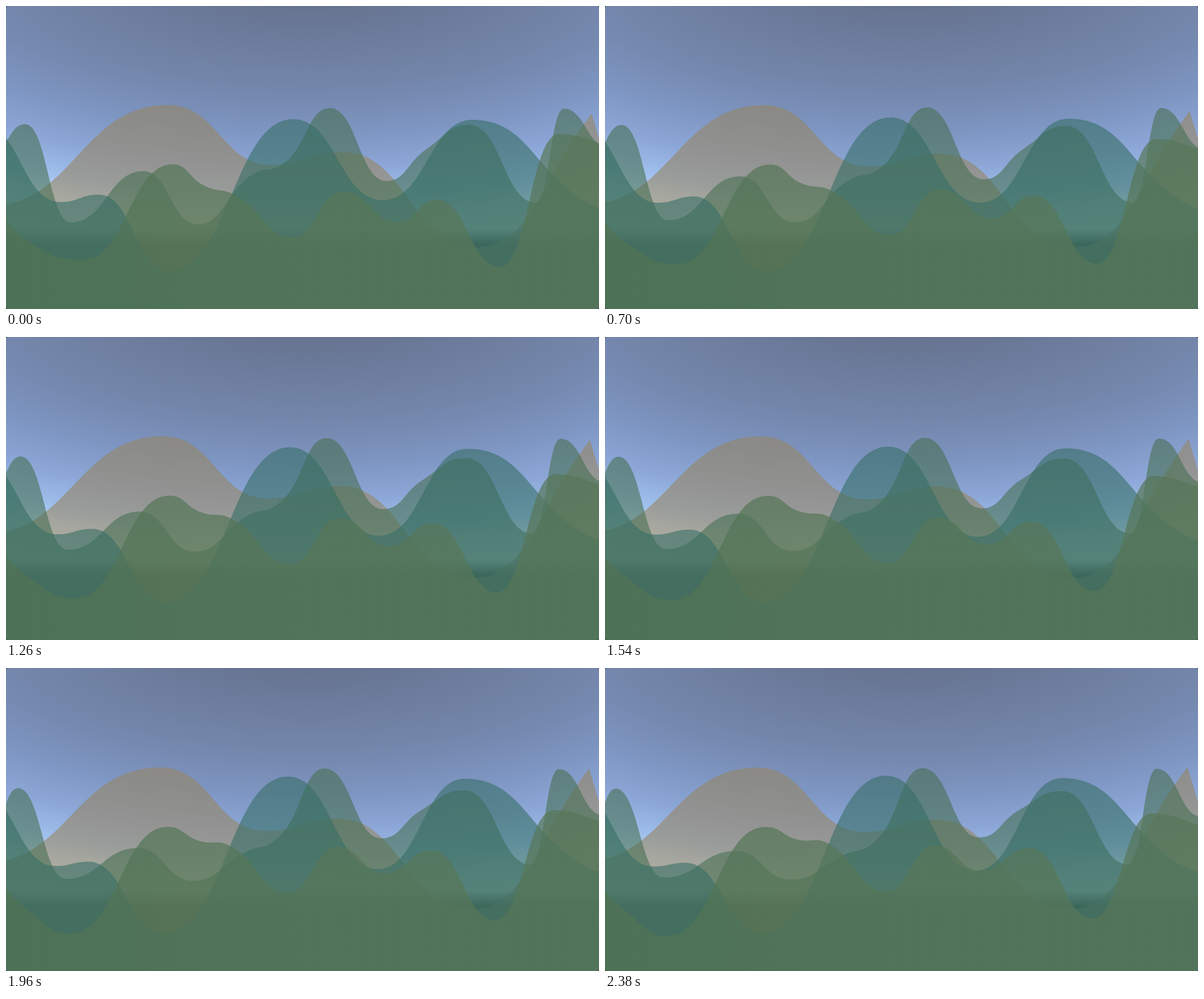
Animation, 960 px wide and 490 px high, one loop 2.45 s. Source, as an HTML page with a canvas:

```html
<!DOCTYPE html>
<html lang="en">
<head>
<meta charset="utf-8">
<title>Drifting hills</title>
<style>
html, body { margin: 0; width: 100%; height: 100%; overflow: hidden; background: #2a2e35; }
canvas { display: block; border-radius: 3px; }
</style>
</head>
<body>
<canvas id="stage" width="960" height="490"></canvas>
<script>
const W = 960, H = 490, LOOP = 2450, STEP = 70;
const DRIFT = -10;      // how far a ridge slides sideways in one loop
const ROUNDNESS = .48;  // handle length as a share of the gap between key points
const ctx = document.getElementById('stage').getContext('2d');

function gradient(g, stops) {
  for (const [at, color] of stops) g.addColorStop(at, color);
  return g;
}

const sky = gradient(ctx.createRadialGradient(0, 0, 0, 0, 0, 440), [
  [.14, '#677491'], [.45, '#7487ac'], [.6, '#7d95c1'], [.73, '#8ca7d7'],
  [.84, '#a0c0ed'], [.91, '#c2ddf8'], [1, '#dff0ff']]);
const ground = gradient(ctx.createLinearGradient(0, 360, 0, 385),
  [[0, 'rgba(60,70,72,0)'], [1, 'rgb(60,70,72)']]);
const meadow = gradient(ctx.createLinearGradient(0, 0, W, 0),
  [[0, 'rgba(80,115,84,.7)'], [.5, 'rgba(87,118,88,.7)']]);

// Peaks, valleys and shoulders: x, y, rise over one loop, own drift if it differs
const ridges = [
  { fill: 'rgba(150,133,100,.6)', endSlope: -1.3, points: [
    [-30, 324, -10], [262, 160, 1, -15], [430, 257, 8], [545, 236, 9], [760, 390, 0],
    [948, 174, -14, -5]] },
  { fill: 'rgba(72,112,84,.6)', points: [
    [-25, 240, 10, 5], [31, 191, 4, -14], [105, 350, -11], [222, 267, 29], [310, 353, -11],
    [395, 275, 28], [455, 250, 22], [524, 165, -3], [616, 283, -9], [680, 232, -2],
    [750, 192, 7], [858, 318, 0], [903, 166, -3], [975, 228, 12]] },
  { fill: 'rgba(56,110,102,.6)', points: [
    [-40, 190, 8], [88, 317, 4], [150, 305, 10, -20], [265, 429, 1], [465, 183, -9],
    [610, 314, 14], [755, 184, -6, -15], [945, 320, 0], [1010, 324, 0]] },
  { fill: meadow, points: [
    [-60, 300, 5], [40, 383, 7], [125, 410, 24, -25], [270, 256, 1], [320, 290, -13],
    [375, 308, -22], [465, 374, -13], [545, 300, -13], [635, 350, -22, -27], [697, 313, -22],
    [800, 422, -17], [895, 207, 28], [1000, 228, 28]] }
];

function drawBackdrop() {
  ctx.save();
  ctx.translate(490, -60);
  ctx.scale(2.6, 1);
  ctx.fillStyle = sky;
  ctx.fillRect(-W, 0, 2 * W, 2 * H);
  ctx.restore();
  ctx.fillStyle = ground;
  ctx.fillRect(0, 360, W, H - 360);
}

// Level at peaks and valleys, following the neighbours on shoulders
function slopeAt(pts, i) {
  const [[x0, y0], [, y], [x1, y1]] = pts.slice(i - 1, i + 2);
  return (y - y0) * (y1 - y) > 0 ? (y1 - y0) / (x1 - x0) : 0;
}

function drawRidge({ fill, points, endSlope = 0 }, k) {
  const pts = points.map(([x, y, rise, drift = DRIFT]) => [x + drift * k, y + rise * k]);
  const last = pts.length - 1;
  ctx.beginPath();
  ctx.moveTo(pts[0][0], H);
  ctx.lineTo(...pts[0]);
  let slope = 0;
  for (let i = 1; i <= last; i++) {
    const [x0, y0] = pts[i - 1], [x1, y1] = pts[i];
    const next = i < last ? slopeAt(pts, i) : endSlope;
    const d = (x1 - x0) * ROUNDNESS;
    ctx.bezierCurveTo(x0 + d, y0 + slope * d, x1 - d, y1 - next * d, x1, y1);
    slope = next;
  }
  ctx.lineTo(W + 83, H);
  ctx.fillStyle = fill;
  ctx.fill();
}

function frame() {
  const step = Math.floor(performance.now() % LOOP / STEP);
  const k = step / (LOOP / STEP - 1);
  drawBackdrop();
  for (const ridge of ridges) drawRidge(ridge, k);
  requestAnimationFrame(frame);
}
frame();
</script>
</body>
</html>
```
